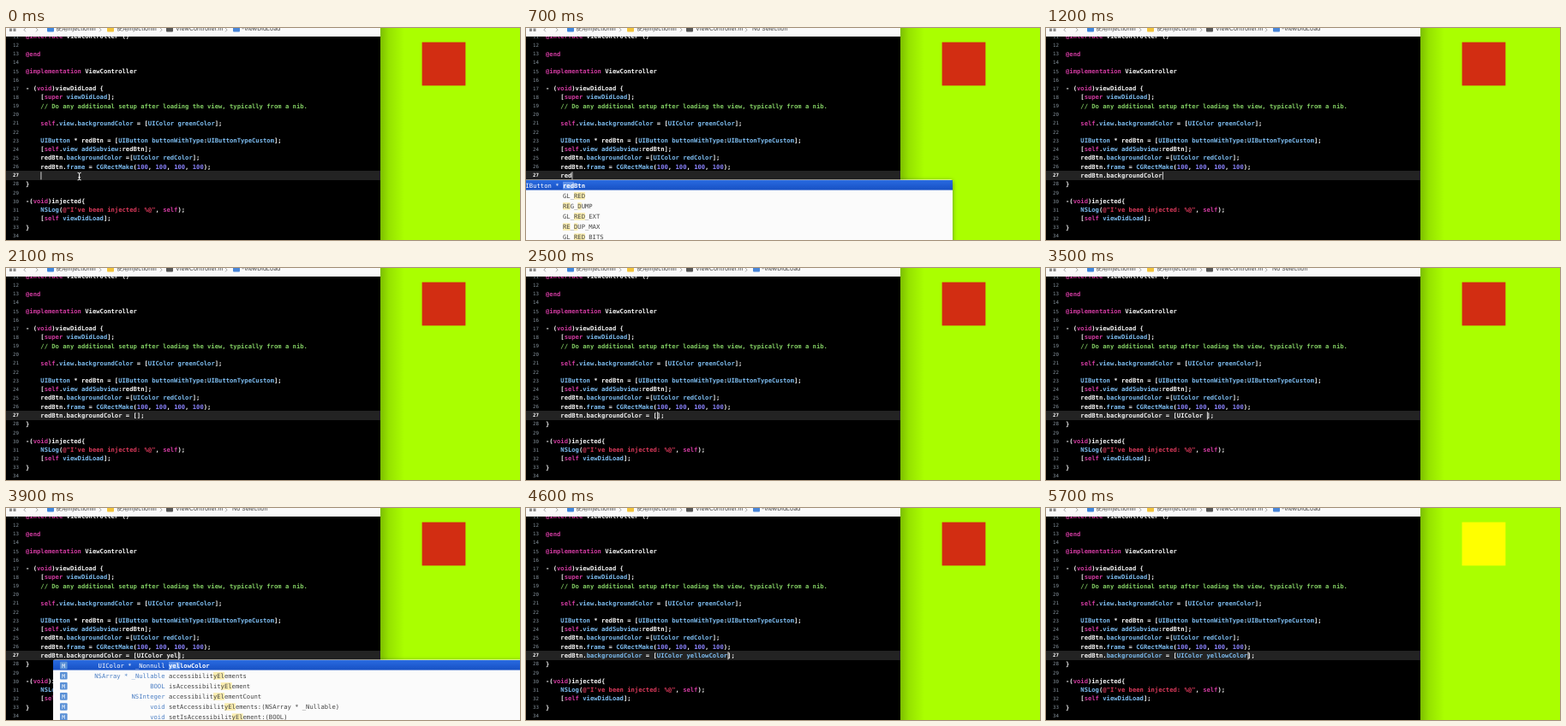
Animation of 600x248 px, one loop 5.8 s. Source, as an HTML page:

```html
<!DOCTYPE html>
<html lang="en">
<head>
<meta charset="utf-8">
<title>Live code editing</title>
<style>
html, body { margin: 0; width: 100%; height: 100%; overflow: hidden; background: #000; }
svg { display: block; width: 600px; height: 248px; }
text { white-space: pre; text-rendering: geometricPrecision; fill: currentColor; }
.mono { font: 7.2px "DejaVu Sans Mono", monospace; }
.code { font-weight: bold; color: #f4f4f4; }
.num { font: 5.8px "DejaVu Sans Mono", monospace; text-anchor: end; color: #84909a; }
.num.active { font-weight: bold; color: #fff; }
.bar { font: 6.9px Inter, "Noto Sans CJK SC", "Noto Sans CJK", sans-serif; color: #404040; }
.comment { color: #80cc62; }
.string { color: #d8385a; }
.keyword { color: #cf3a9f; }
.number { color: #8b84ff; }
.symbol { color: #7cbcf0; }
</style>
</head>
<body>
<svg viewBox="0 0 600 248">
  <defs>
    <linearGradient id="edge">
      <stop offset="0" stop-color="#234000" stop-opacity=".34"/>
      <stop offset=".35" stop-color="#234000" stop-opacity=".15"/>
      <stop offset="1" stop-color="#234000" stop-opacity="0"/>
    </linearGradient>
    <linearGradient id="selected" x2="0" y2="1">
      <stop offset="0" stop-color="#2a6be0"/>
      <stop offset="1" stop-color="#1650c4"/>
    </linearGradient>
    <filter id="shadow" x="-10%" y="-30%" width="120%" height="160%">
      <feDropShadow dx="0" dy="1" stdDeviation="2.5" flood-opacity=".45"/>
    </filter>
    <clipPath id="editor"><rect width="437" height="248"/></clipPath>
  </defs>
  <g clip-path="url(#editor)">
    <rect width="437" height="248"/>
    <rect y="167" width="437" height="11" fill="#232323"/>
    <g id="code"></g>
    <g id="typing"></g>
    <path id="pointer" fill="none" stroke="#fff"
      d="M83.6 169.3q2 0 2 1.4v5.8q0 1.4-2 1.4M87.6 169.3q-2 0-2 1.4M87.6 177.9q-2 0-2-1.4M84.3 174.8h2.6"/>
    <g id="bar"></g>
  </g>
  <rect x="437" width="163" height="248" fill="#aaff00"/>
  <rect x="437" width="28" height="248" fill="url(#edge)"/>
  <rect id="button" x="485.6" y="16.6" width="50.8" height="50.8"/>
  <g id="popup"></g>
</svg>
<script>
const LOOP = 5800, ADVANCE = 7.2 * 0.602, LEFT = 23, INDENT = LEFT + 4 * ADVANCE;
const FIRST_LINE = 11, EDIT_LINE = 27;
const $ = id => document.getElementById(id);
const baseline = line => 22.6 + (line - 12) * 10.14;

const source = `@interface ViewController ()

@end

@implementation ViewController

- (void)viewDidLoad {
    [super viewDidLoad];
    // Do any additional setup after loading the view, typically from a nib.

    self.view.backgroundColor = [UIColor greenColor];

    UIButton * redBtn = [UIButton buttonWithType:UIButtonTypeCustom];
    [self.view addSubview:redBtn];
    redBtn.backgroundColor =[UIColor redColor];
    redBtn.frame = CGRectMake(100, 100, 100, 100);

}

-(void)injected{
    NSLog(@"I've been injected: %@", self);
    [self viewDidLoad];
}
`.split("\n");

const kinds = ["comment", "string", "keyword", "number", "symbol"];
const tokens = /(\/\/.*)|(@?"[^"]*")|(@\w+|\b(?:void|self|super)\b)|(\b\d+\b)|(\b(?:UI\w+|CGRectMake|NSLog|addSubview|buttonWithType|\w+Color|frame|view)\b|(?<!\))\bviewDidLoad\b)/g;

function highlight(line) {
  return line.replace(tokens, (word, ...groups) => {
    const kind = kinds[groups.slice(0, kinds.length).findIndex(Boolean)];
    return `<tspan class="${kind}">${word}</tspan>`;
  });
}

const label = (cls, x, y, content, extra = "") =>
  `<text class="${cls}" x="${x}" y="${y}" ${extra}>${content}</text>`;
const box = (x, y, w, h, fill, extra = "") =>
  `<rect x="${x}" y="${y}" width="${w}" height="${h}" fill="${fill}" ${extra}/>`;

// Square brackets in a suggestion mark the matched letters.
const popups = {
  red: {
    x: -40, right: 498, name: 43, rows: [
      ["UIButton *", "[red]Btn"], ["", "GL_[RED]"], ["", "[RE]G_[D]UMP"],
      ["", "GL_[RED]_EXT"], ["", "[RE]_[D]UP_MAX"], ["", "GL_[RED]_BITS"]]
  },
  ui: {
    x: 124, right: 438, name: 156, badge: "C", rows: [
      ["", "[UI]Color"], ["", "[UI]Button"], ["", "[UI]View"],
      ["", "[UI]Image"], ["", "[UI]Label"], ["", "[UI]Screen"]]
  },
  yel: {
    x: 55, right: 606, name: 190, badge: "M", rows: [
      ["UIColor * _Nonnull", "[yel]lowColor"],
      ["NSArray * _Nullable", "accessibilit[yEl]ements"],
      ["BOOL", "isAccessibilit[yEl]ement"],
      ["NSInteger", "accessibilit[yEl]ementCount"],
      ["void", "setAccessibilit[yEl]ements:(NSArray * _Nullable)"],
      ["void", "setIsAccessibilit[yEl]ement:(BOOL)"]]
  }
};

function popupMarkup({ x, right, name, badge, rows }) {
  let out = box(x, 177.5, right - x, 80, "#fbfbfb", 'rx="2" filter="url(#shadow)"') +
    box(x, 178, right - x, 11.6, "url(#selected)");
  rows.forEach(([type, item], i) => {
    const y = 186.6 + i * 12.1, active = i === 0;
    let column = 0;
    item.split(/[\[\]]/).forEach((part, k) => {
      if (k % 2) out += box(name + column * ADVANCE, y - 6.7, part.length * ADVANCE, 8.6,
        active ? "#5d91ea" : "#fbeeb0");
      column += part.length;
    });
    if (badge) out += box(x + 8, y - 6.8, 8.6, 8.6, "#5b91d6", 'rx="1"') +
      label("mono", x + 10.2, y - 0.1, badge, 'style="color:#fff;font-size:6.5px"');
    out += label("mono", name - 4.5, y, type,
      `text-anchor="end" style="color:${active ? "#fff" : "#4c7fc4"}"`);
    out += label("mono", name, y, item.replace(/[\[\]]/g, ""),
      `style="${active ? "color:#fff;font-weight:bold" : "color:#444"}"`);
  });
  return out;
}

const chevron = (x, dir = 1) =>
  `<path d="M${x} 0l${2.2 * dir} 2l${-2.2 * dir} 2.4" fill="none" stroke="#888" stroke-width=".7"/>`;
const icon = (x, fill) => box(x, -2, 8, 6.5, fill, 'rx="1"');

function barMarkup(noSelection) {
  const crumb = noSelection
    ? label("bar", 264, 2.8, "No Selection")
    : icon(265, "#4a86d8") + label("bar", 275, 2.8, "-viewDidLoad");
  return box(0, 0, 437, 10, "#fafafa") +
    box(4, 0.5, 3, 3.5, "#888") + box(8.5, 0.5, 3, 3.5, "#888") +
    chevron(23, -1) + chevron(35) +
    icon(48, "#3f86dd") + label("bar", 58, 2.8, "使用injectionIII") + chevron(109) +
    icon(118, "#f2c43d") + label("bar", 129, 2.8, "使用injectionIII") + chevron(180) +
    icon(187, "#555") + label("bar", 198, 2.8, "ViewController.m") + chevron(256) + crumb;
}

// start, text before caret, text after caret, "No Selection" shown, popup
const steps = [
  [0, "", ""],
  [300, "r", "", true],
  [400, "re", "", true],
  [500, "red", "", true],
  [600, "red", "", true, "red"],
  [800, "redBtn", "", true],
  [900, "redBtn.", "", true],
  [1000, "redBtn.ba", "", true],
  [1100, "redBtn.backgroundColor", "", true],
  [1200, "redBtn.backgroundColor", ""],
  [1400, "redBtn.backgroundColor ", "", true],
  [1500, "redBtn.backgroundColor =", "", true],
  [1600, "redBtn.backgroundColor = ", ""],
  [1800, "redBtn.backgroundColor = [", "]", true],
  [1900, "redBtn.backgroundColor = []", "", true],
  [2000, "redBtn.backgroundColor = [];", ""],
  [2300, "redBtn.backgroundColor = [", "];"],
  [2700, "redBtn.backgroundColor = [u", "];", true],
  [2800, "redBtn.backgroundColor = [ui", "];", true],
  [2900, "redBtn.backgroundColor = [ui", "];"],
  [3100, "redBtn.backgroundColor = [ui", "];", true, "ui"],
  [3300, "redBtn.backgroundColor = [UIColor", "];", true],
  [3400, "redBtn.backgroundColor = [UIColor ", "];", true],
  [3600, "redBtn.backgroundColor = [UIColor y", "];", true],
  [3700, "redBtn.backgroundColor = [UIColor ye", "];", true],
  [3800, "redBtn.backgroundColor = [UIColor yel", "];", true, "yel"],
  [4100, "redBtn.backgroundColor = [UIColor yellowColor", "];", true],
  [4400, "redBtn.backgroundColor = [UIColor yellowColor", "];"]
];
const caretGaps = [[1950, 2300], [4700, 5200]];
const COLOURED_AT = 4400, YELLOW_AT = 5100;

$("code").innerHTML = source.map((line, i) => {
  const number = FIRST_LINE + i, y = baseline(number);
  return label(number === EDIT_LINE ? "num active" : "num", 15, y - 0.4, number) +
    label("mono code", LEFT, y, highlight(line));
}).join("");

let shown = null;
function render(t) {
  const step = steps.findLast(s => s[0] <= t);
  const [since, before, after, noSelection, popup] = step;
  if (step !== shown) {
    shown = step;
    const text = before + after;
    // The line stays plain until the statement is complete.
    $("typing").innerHTML =
      label("mono code", INDENT, baseline(EDIT_LINE), since < COLOURED_AT ? text : highlight(text)) +
      box(INDENT + before.length * ADVANCE + 0.2, 168.2, 0.8, 9.2, "#fff", 'id="caret"');
    $("bar").innerHTML = barMarkup(noSelection);
    $("popup").innerHTML = popup ? popupMarkup(popups[popup]) : "";
  }
  const hidden = caretGaps.some(([from, to]) => t >= from && t < to);
  $("caret").setAttribute("opacity", hidden ? 0 : 1);
  $("pointer").setAttribute("opacity", t < 300 ? 1 : 0);
  $("button").setAttribute("fill", t < YELLOW_AT ? "#d22d12" : "#ffff00");
}

const start = performance.now();
function frame() {
  render((performance.now() - start) % LOOP);
  requestAnimationFrame(frame);
}
frame();
</script>
</body>
</html>
```
